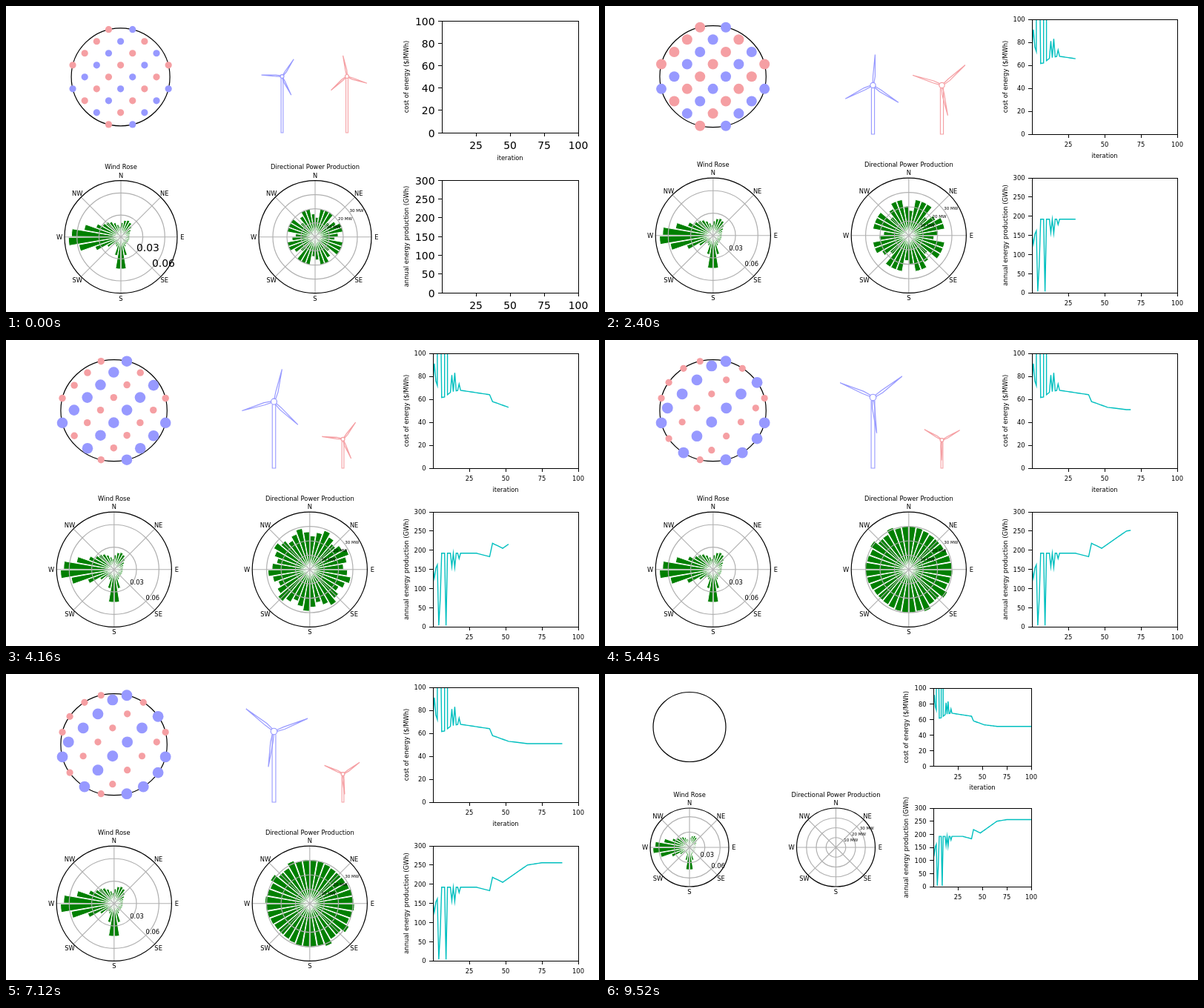
An HTML page with a canvas that plays this animation: 800 by 413 pixels, repeating every 9600 ms.

```html
<!DOCTYPE html>
<html>
<head>
<meta charset="utf-8">
<style>
  html, body { margin: 0; width: 100%; height: 100%; overflow: hidden; background: #fff; }
  canvas { display: block; }
</style>
</head>
<body>
<canvas id="stage" width="800" height="413"></canvas>
<script>
const ctx = document.getElementById('stage').getContext('2d');
const STEP = 80, STEPS = 120, SMALL = 8.33;
const BLUE = '#9799ff', RED = '#f59fa3', GREEN = '#008000', GRID = '#b0b0b0', CYAN = '#00bfbf';

// Panel geometry of the first, main and closing figure
const FIRST = {
  farm: [154.6, 95.8, 66.5, 66], polarY: 311.7, polarR: 76, roseX: 155, powerX: 417,
  hubs: [372.5, 460], scale: 1, chart: [588, 772], cost: [20, 171], energy: [235, 387],
  tick: 13.9, labelX: 540
};
const MAIN = {
  farm: [145.6, 95.2, 71.7, 68.5], polarY: 309.8, polarR: 77.6, roseX: 145.8, powerX: 409.8,
  hubs: [361.5, 454.5], scale: 1, chart: [576, 772], cost: [18, 173], energy: [232, 387],
  tick: SMALL, labelX: 540
};
const CLOSING = {
  farm: [114, 71.5, 49, 47], polarY: 234, polarR: 53, roseX: 114, powerX: 311.5,
  hubs: [278, 341], scale: .68, chart: [443, 575], cost: [19, 124.5], energy: [181, 287],
  tick: SMALL, labelX: 406
};

const rad = deg => deg * Math.PI / 180;
const cosd = deg => Math.cos(rad(deg));
const sind = deg => Math.sin(rad(deg));
const lerp = (a, b, t) => a + (b - a) * t;
const bell = (d, width) => Math.exp(-d * d / (2 * width * width));

// Piecewise linear curve through x, y, x, y, ...
function at(curve, x) {
  for (let i = 2; i < curve.length; i += 2)
    if (x < curve[i]) return lerp(curve[i - 1], curve[i + 1], (x - curve[i - 2]) / (curve[i] - curve[i - 2]));
  return curve[curve.length - 1];
}

// Optimiser history: a steady trend with failed trials (step, depth, width) early on
const ENERGY_TREND = [0, 192, 30, 192, 39, 183, 41, 218, 48, 205, 65, 250, 75, 256];
const COST_TREND = [0, 60, 8, 62, 12, 66, 18, 68, 39, 64, 41, 58, 52, 53, 65, 51];
const TRIALS = [[1, 65, 2.5], [4.3, 240, 1.4], [9, 189, 1], [13, 35, 1], [15, 37, 1], [18, 14, 1]];

function energy(step) {
  const loss = TRIALS.reduce((sum, [s, depth, width]) => sum + depth * Math.max(0, 1 - Math.abs(step - s) / width), 0);
  return Math.max(3, at(ENERGY_TREND, step) - loss);
}
const cost = step => at(COST_TREND, step) * at(ENERGY_TREND, step) / energy(step);

// Sizes go from the first guess to equal turbines, then to two kinds
const phase = (step, [first, equal, split, last]) =>
  at([0, first, 6, equal, 30, equal, 41, split, 68, last], step);
const TURBINES = [
  { color: BLUE, start: 34, spin: -5, dot: [4.6, 7, 7.2, 7.4], blade: [28, 41.5, 42.5, 48.5], height: [76, 66, 86, 95.5] },
  { color: RED, start: -11, spin: -6, dot: [4.6, 7, 4.8, 4.6], blade: [28.5, 41.5, 29, 27.5], height: [76, 66, 40, 38] }
];

// Bar lengths by bearing, as fractions of the outer radius
const BEARINGS = Array.from({ length: 36 }, (_, k) => 5 + 10 * k);
const WIND_LOBES = [[267, 60, 17], [180, 36, 11], [315, 14, 22], [25, 13, 20]];
const windBar = b => WIND_LOBES.reduce((sum, [mid, size, width]) => sum + size * bell(b - mid, width), 12) / 78;

function powerBar(b, step) {
  const grid = 50 - 17 * Math.max(0, cosd(8 * (b - 2)));
  const mixed = 51.5 - 5.5 * cosd(9 * (b - 5));
  const spread = 57.5 + 2 * cosd(4 * b) + 6 * Math.max(0, -sind(2 * b)) * Math.max(0, cosd(12 * (b - 5)));
  const perUnit = at([0, grid / 194, 30, grid / 194, 41, mixed / 217, 52, mixed / 217, 63, spread / 255], step);
  return energy(step) * perUnit / 78;
}

// Staggered farm grid on the unit disc
const ROWS = ['RB', 'RBR', 'RBRB', 'RBRBR', 'BRBR', 'BRBRB', 'RBRB', 'BRB', 'RB'];
const FARM = ROWS.flatMap((row, j) => [...row].map((kind, i) => ({
  x: (2 * i - row.length + 1) / 4.12, y: (j - 4) / 4.12, type: TURBINES[kind === 'B' ? 0 : 1]
})));

// Dots drift outwards until they meet the rim; inner ones also lean upwind
function spreadOut({ x, y }, t) {
  const r = Math.hypot(x, y), k = Math.min(1, r * 1.14) / (r || 1);
  const lean = r < .8 ? 1 : 0;
  return [lerp(x, x * k - .025 * lean, t), lerp(y, y * k - .05 * lean, t)];
}

function text(str, x, y, size = SMALL, align = 'center', turn = 0) {
  ctx.save();
  ctx.translate(x, y);
  ctx.rotate(turn);
  ctx.font = `${size}px "DejaVu Sans", sans-serif`;
  ctx.textAlign = align;
  ctx.fillStyle = '#000';
  ctx.fillText(str, 0, size * .36);
  ctx.restore();
}

function path(points, color, width = 1.1, close = false) {
  ctx.beginPath();
  points.forEach(([x, y]) => ctx.lineTo(x, y));
  if (close) ctx.closePath();
  ctx.strokeStyle = color;
  ctx.lineWidth = width;
  ctx.stroke();
}

function ellipse(x, y, rx, ry, stroke, fill) {
  ctx.beginPath();
  ctx.ellipse(x, y, rx, ry, 0, 0, 7);
  if (fill) { ctx.fillStyle = fill; ctx.fill(); }
  if (stroke) { ctx.strokeStyle = stroke; ctx.lineWidth = 1.2; ctx.stroke(); }
}

function farm(fig, step, empty) {
  const [cx, cy, rx, ry] = fig.farm;
  ellipse(cx, cy, rx, ry, '#000');
  if (empty) return;
  const t = at([0, 0, 40, 0, 52, .17, 63, .9, 68, 1], step);
  for (const spot of FARM) {
    const [x, y] = spreadOut(spot, t);
    const r = phase(step, spot.type.dot) * fig.scale;
    ellipse(cx + x * rx, cy + y * ry, r, r, null, spot.type.color);
  }
}

function turbine(fig, step, { color, start, spin, blade, height }, x) {
  const r = phase(step, blade) * fig.scale, base = fig.cost[1];
  const hubY = base - phase(step, height) * fig.scale, half = r * .05, hub = r * .088;
  path([[x - half, hubY + hub], [x - half, base], [x + half, base], [x + half, hubY + hub]], color);
  for (let k = 0; k < 3; k++) {
    ctx.save();
    ctx.translate(x, hubY);
    ctx.rotate(rad(start + spin * step + 120 * k));
    path([[-.01 * r, -hub], [.03 * r, -hub], [.05 * r, -.3 * r], [0, -r], [-.02 * r, -.3 * r]], color, 1.2, true);
    ctx.restore();
  }
  ellipse(x, hubY, hub, hub, color, '#fff');
}

function polar(fig, x, title, bar, rings, labels, labelBearing, size) {
  const y = fig.polarY, r = fig.polarR;
  ctx.fillStyle = GREEN;
  ctx.strokeStyle = '#fff';
  ctx.lineWidth = 1;
  if (bar) for (const b of BEARINGS) {
    ctx.beginPath();
    ctx.moveTo(x, y);
    ctx.arc(x, y, bar(b) * r, rad(b - 94.5), rad(b - 85.5));
    ctx.closePath();
    ctx.fill();
    ctx.stroke();
  }
  ['N', 'NE', 'E', 'SE', 'S', 'SW', 'W', 'NW'].forEach((name, k) => {
    const dx = sind(45 * k), dy = -cosd(45 * k);
    path([[x, y], [x + r * dx, y + r * dy]], GRID);
    text(name, x + (r + 7) * dx, y + (r + 7) * dy);
  });
  rings.forEach(f => ellipse(x, y, r * f, r * f, GRID));
  ellipse(x, y, r, r, '#000');
  rings.forEach((f, i) =>
    text(labels[i], x + r * f * sind(labelBearing), y - r * f * cosd(labelBearing) - size / 2, size, 'left'));
  text(title, x, y - r - 18.3);
}

function chart(fig, [top, bottom], label, max, stepY, curve, step) {
  const [left, right] = fig.chart;
  const px = v => left + (right - left) * v / 100;
  const py = v => bottom - (bottom - top) * v / max;
  if (step > 0) {
    const points = [];
    for (let i = 0; i <= Math.min(step, 100); i++) points.push([px(i), py(curve(i))]);
    ctx.save();
    ctx.beginPath();
    ctx.rect(left, top, right - left, bottom - top);
    ctx.clip();
    path(points, CYAN, 1.4);
    ctx.restore();
  }
  const snap = v => Math.floor(v) + .5;
  ctx.strokeStyle = '#000';
  ctx.lineWidth = 1;
  ctx.strokeRect(snap(left), snap(top), right - left, Math.floor(bottom - top));
  for (let v = 25; v <= 100; v += 25) {
    path([[snap(px(v)), bottom], [snap(px(v)), bottom + 5]], '#000', 1);
    text(v, px(v), bottom + 10 + fig.tick / 2, fig.tick);
  }
  for (let v = 0; v <= max; v += stepY) {
    path([[left - 5, snap(py(v))], [left, snap(py(v))]], '#000', 1);
    text(v, left - 9.5, py(v) + .5, fig.tick, 'right');
  }
  text(label, fig.labelX, (top + bottom) / 2, SMALL, 'center', -Math.PI / 2);
}

function draw(step) {
  const fig = step === 0 ? FIRST : step <= 100 ? MAIN : CLOSING;
  const empty = step === STEPS - 1;
  ctx.fillStyle = '#fff';
  ctx.fillRect(0, 0, 800, 413);

  farm(fig, step, empty);
  if (!empty) TURBINES.forEach((t, i) => turbine(fig, step, t, fig.hubs[i]));

  polar(fig, fig.roseX, 'Wind Rose', windBar, [.39, .78], ['0.03', '0.06'], 135, fig.tick);
  polar(fig, fig.powerX, 'Directional Power Production', empty ? null : b => powerBar(b, step),
    [.25, .5, .75], ['10 MW', '20 MW', '30 MW'], 54.5, 5.5);

  chart(fig, fig.cost, 'cost of energy ($/MWh)', 100, 20, cost, step);
  chart(fig, fig.energy, 'annual energy production (GWh)', 300, 50, energy, step);
  text('iteration', (fig.chart[0] + fig.chart[1]) / 2, fig.cost[1] + 21.5 + .9 * fig.tick);
}

const began = performance.now();
function tick() {
  draw(Math.floor(Math.max(0, performance.now() - began) / STEP) % STEPS);
  requestAnimationFrame(tick);
}
tick();
</script>
</body>
</html>
```
